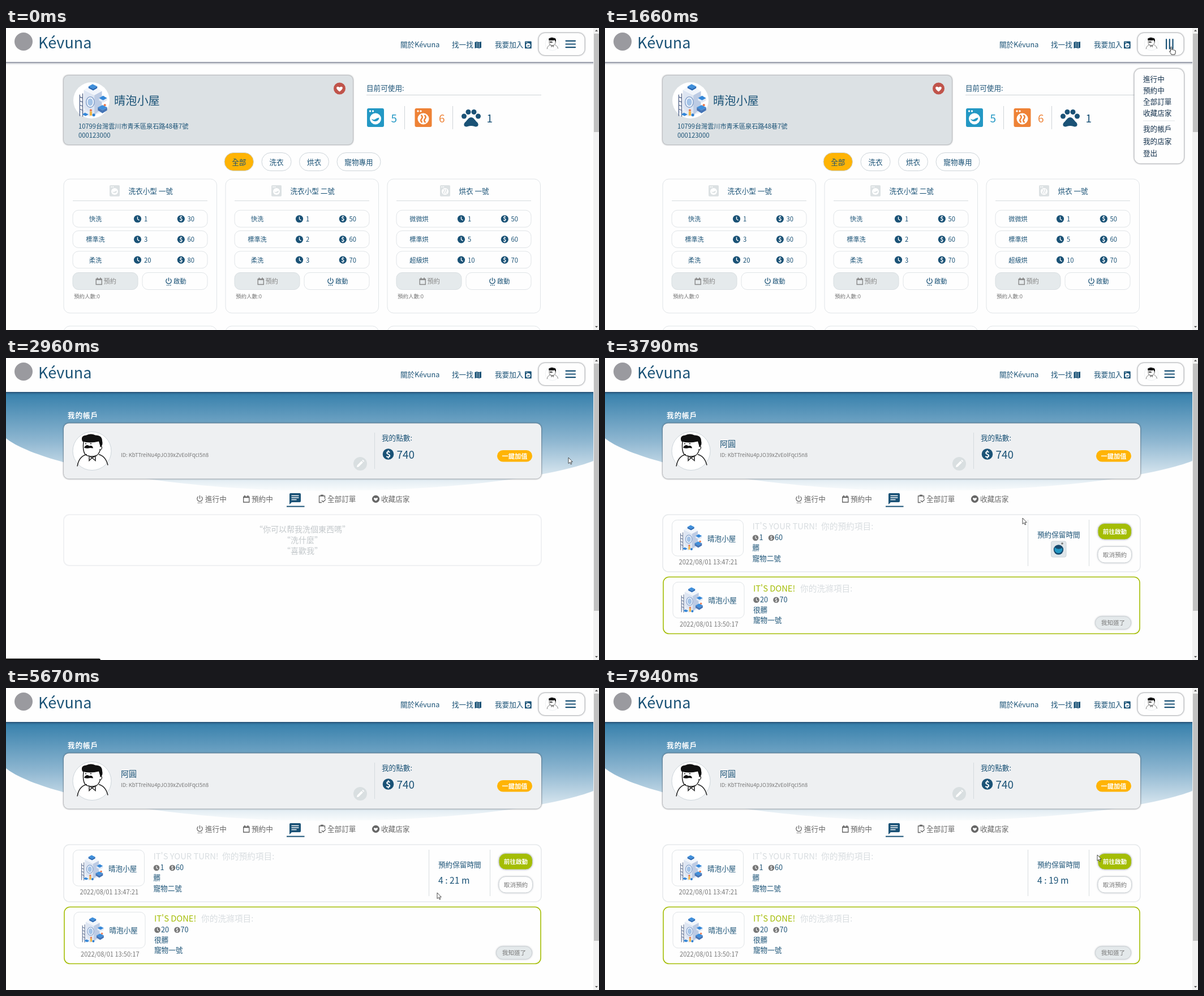
Write an HTML page that moves like this. It is 1048 px wide and 534 px high and loops after 8000 ms.

```html
<!DOCTYPE html>
<html lang="zh-Hant">
<head>
<meta charset="utf-8">
<title>Laundry booking</title>
<style>
html, body { margin: 0; width: 100%; height: 100%; overflow: hidden; background: #fefefe; }
svg { display: block; width: 100vw; height: 100vh; }
text { font-family: "Noto Sans CJK TC", "Noto Sans CJK", "Noto Sans", sans-serif; white-space: pre; }
.soft { filter: drop-shadow(0 0 1.6px rgba(45, 50, 60, .85)); }
.faint { filter: drop-shadow(0 0 1.5px rgba(60, 70, 85, .35)); }
</style>
</head>
<body>
<svg id="stage" viewBox="0 0 1048 534"></svg>
<script>
const LOOP = 8000;
const NAVY = '#1a5276', LINE = '#e0e4e7', GRAY = '#777', PALE = '#dce1e3', AMBER = '#ffb404', LIME = '#a4bd04';
const BRAND = 'Kévuna', SHOP = '晴泡小屋';

// Drawing helpers; text is placed by its vertical centre.
const text = (x, cy, s, size = 12.6, fill = NAVY, more = '') =>
  `<text x="${x}" y="${cy + size * .37}" font-size="${size}" fill="${fill}" ${more}>${s}</text>`;
const mid = (x, cy, s, size, fill, more = '') => text(x, cy, s, size, fill, 'text-anchor="middle" ' + more);
const box = (x, y, w, h, r, fill = '#fefefe', stroke = 'none', more = '') =>
  `<rect x="${x}" y="${y}" width="${w}" height="${h}" rx="${r}" fill="${fill}" stroke="${stroke}" ${more}/>`;
const dot = (x, y, r, fill, more = '') => `<circle cx="${x}" cy="${y}" r="${r}" fill="${fill}" ${more}/>`;
const path = (d, fill = 'none', stroke = 'none', width = 1, more = '') =>
  `<path d="${d}" fill="${fill}" stroke="${stroke}" stroke-width="${width}" ${more}/>`;
const at = (x, y, scale, body) => `<g transform="translate(${x} ${y}) scale(${scale})">${body}</g>`;
const layer = (id, body) => `<g id="${id}">${body}</g>`;
const BOLD = 'font-weight="700"', MEDIUM = 'font-weight="500"';

// Icons
const washer = (x, y, scale, color, dry) => at(x, y, scale,
  box(0, 0, 30, 33, 3, color) + dot(5.5, 5, 1.7, '#fff') + dot(10.5, 5, 1.7, '#fff') + dot(15, 18.5, 10, '#fff') +
  (dry
    ? path('M11 12q4 3 1 6.500t1 6.500M17 12q4 3 1 6.500t1 6.500', 'none', color, 2.6)
    : path('M8 18.500q4 3 7 .5t6.500-2.500a7 7 0 0 1-13.500 2z', color)));
const clock = (x, y, r, color) => at(x, y, r / 6.5,
  dot(0, 0, 6.5, color) + path('M0-4V.5L3 2.500', 'none', '#fff', 1.3));
const coin = (x, y, r, color) => dot(x, y, r, color) +
  mid(x, y, '$', r * 1.6, '#fff', BOLD);
const heart = (x, y, scale, fill) => at(x, y, scale,
  path('M0 5C-9-1-5-6 0-2.500C5-6 9-1 0 5z', fill));
const calendar = (x, y, color) => at(x, y, 1,
  path('M.7 2.500H10.800V12H.7z', 'none', color, 1.4) + path('M.7 3.200H10.800M3 0V3M8.500 0V3', 'none', color, 2));
const power = (x, y, color) => at(x, y, 1,
  path('M-2.700-4A4.700 4.700 0 1 0 2.700-4M0-6V0', 'none', color, 1.3) +
  path('M-3.500 7.200H4', 'none', color, 1.5, 'stroke-dasharray="1.5 1.5"'));
const paw = at(822, 159, 1,
  path('M0-1C5-1 7 5 11 8C15 13 11 17 6 15Q0 13-6 15C-11 17-15 13-11 8C-7 5-5-1 0-1z', NAVY) +
  [[-12.500, -3], [-5, -10.500], [5, -10.500], [12.500, -3]].map(([x, y]) => dot(x, y, 4.500, NAVY)).join(''));

const laundry = (x, y, scale) => at(x, y, scale,
  path('M-24 20L-4 28L24 18L6 8z', '#e8edf6') +
  path('M-14-18L4-9V25L-14 14z', '#dde5f2') + path('M4-9L17-16V14L4 25z', '#bccbe4') +
  path('M-14-18L0-26L17-16L4-9z', '#f1f5fb') +
  path('M-6-24L1-28L9-24L2-20z', '#3f8fdb') + path('M-6-24V-21L2-17L9-21V-24L2-20z', '#2767b3') +
  path('M-21-10V27M-16-12V28M-21-6l5 2m-5 5l5 2m-5 5l5 2m-5 5l5 2', 'none', '#4a5d84', 1.2) +
  '<ellipse cx="-3" cy="3" rx="7" ry="9" fill="#f7faff" stroke="#86a2cb" stroke-width="1.5"/>' +
  '<ellipse cx="-3" cy="3" rx="4.5" ry="6.5" fill="#a3c2e6"/>' +
  path('M12-4l7-4 7 4-7 4z', '#3487d8') + path('M12-4v4l7 4 7-4v-4l-7 4z', '#e3eaf5') +
  path('M10 12l8-4 8 4-8 5z', '#3f8fdb') + path('M10 12v5l8 5 8-5v-5l-8 5z', '#4574b5') +
  dot(22, 8, 2, '#e9774d') + dot(-2, 17, 2, '#e9774d') + path('M-4 19h4v7h-4z', '#f0b648') +
  dot(3, 25, 2.500, '#2d7fd0') + path('M-17 24l6 3 5-3-6-3z', '#3487d8'));

const avatar = (x, y, scale) => at(x, y, scale,
  dot(0, 0, 34, '#fff', 'stroke="#cdd5da" stroke-width="1"') +
  path('M-15-17Q-17 0-12 6Q-4 12 8 8Q14 4 16-8M-26 27Q-23 9-9 6M12 6Q24 9 28 25M-6 8L0 12L8 8M0 12l-5 5v-7m5 2l6 5v-7', 'none', '#222', 1.5) +
  path('M-17-17Q-21-27-10-28Q-2-32 6-28Q18-28 18-18Q20-10 15-7L12-17Q-4-13-17-17z', '#111') +
  path('M-14-6Q-10-13-5-9Q1-11 2-5Q-4-6-6-5Q-10-4-14-6z', '#111') +
  dot(-11, -13, 1.100, '#111') + dot(-2, -13, 1.100, '#111') +
  path('M14-8q5-1 3 4q-2 3-4 1', '#fff', '#222', 1.300));

function header() {
  return box(-8, -10, 1054, 70, 0, '#fefefe', 'none', 'style="filter:drop-shadow(0 1px 2px rgba(25,35,65,.85))"') +
    dot(31, 24, 16, '#9a9a9f') + text(57, 26, BRAND, 27) +
    text(697, 29.5, '關於' + BRAND) + text(788, 29.5, '找一找') + text(864, 29.5, '我要加入') +
    path('M828.500 25l3.500-1 4 1 4-1v11l-4 1-4-1-3.500 1z', NAVY) + path('M832.300 25v9m3.800-8v9', 'none', '#fff', .8) +
    washer(917, 23.5, .39, NAVY) +
    box(941.5, 9, 81, 39, 11, '#fefefe', 'none', 'class="soft"') + avatar(965.5, 27.5, .36) +
    layer('burger', path('M989.500 22.800H1006M989.500 28.500H1006M989.500 34.200H1006', 'none', NAVY, 2.200, 'stroke-linecap="round"'));
}

function machineCard(x, title, iconX, titleX, rows, dry) {
  const row = ([name, minutes, price], i) => {
    const cy = 337.5 + i * 36.3;
    return box(x + 16, cy - 15.3, 238, 30, 10, '#fefefe', LINE) + mid(x + 56, cy + .5, name, 11.2, NAVY) +
      clock(x + 130.5, cy, 6.6, NAVY) + text(x + 142, cy + .5, minutes, 11.2) +
      coin(x + 207.3, cy, 6.6, NAVY) + text(x + 218.5, cy + .5, price, 11.2);
  };
  return box(x, 267, 270.5, 237, 11, '#fefefe', LINE) + washer(x + iconX, 278, .6, PALE, dry) +
    text(x + titleX, 288, title) + path(`M${x + 16} 305.500h238`, 'none', '#d6dbde') + rows.map(row).join('') +
    box(x + 16, 432.5, 115, 30, 10, '#e5eaec', '#d8dee1') + calendar(x + 56.5, 441.5, '#888') +
    text(x + 70.5, 448.3, '預約', 11.2, '#888') +
    box(x + 139, 432.5, 115, 30, 10, '#fefefe', LINE) + power(x + 185.5, 447.5, NAVY) +
    text(x + 194, 448.3, '啟動', 11.2, NAVY, MEDIUM) + text(x + 18, 474.5, '預約人數:0', 9.5, GRAY) +
    box(x, 527, 270.5, 30, 11, '#fefefe', LINE);
}

function shopPage() {
  const filter = (x, w, label, fill = '#fefefe') =>
    box(x, 220.5, w, 32, 16, fill, '#cdd4d9') + mid(x + w / 2, 237, label, 12.6, NAVY);
  return box(102, 84, 511, 122, 8, '#dce1e4', 'none', 'class="soft"') +
    dot(151, 128, 32, '#fff') + laundry(152, 128, 1.03) +
    text(191, 129, SHOP, 20.2) +
    text(128, 174, '10799台灣雲川市青禾區泉石路48巷7號', 11.15, NAVY, MEDIUM) + text(128, 190, '000123000', 11.3, NAVY, MEDIUM) +
    dot(589.5, 107, 10.5, '#c0544b') + heart(589.5, 107.5, 1, '#fff') +
    text(637, 106, '目前可使用:') + path('M637 118.500H946M704.500 138V179M789.500 138V179', 'none', '#cfd4d8') +
    washer(638, 142, 1, '#2398c4') + text(680.5, 160, '5', 19, '#2398c4') +
    washer(722.5, 142, 1, '#ee8236', true) + text(765, 160, '6', 19, '#ee8236') +
    paw + text(849.5, 160, '1', 19) +
    filter(386, 51.5, '全部', AMBER) + filter(452, 52, '洗衣') + filter(518.5, 52, '烘衣') + filter(585, 77, '寵物專用') +
    machineCard(102, '洗衣小型 一號', 81, 114.5, [['快洗', 1, 30], ['標準洗', 3, 60], ['柔洗', 20, 80]]) +
    machineCard(388, '洗衣小型 二號', 81, 114.5, [['快洗', 1, 50], ['標準洗', 2, 60], ['柔洗', 3, 70]]) +
    machineCard(674, '烘衣 一號', 93, 126.5, [['微微烘', 1, 50], ['標準烘', 5, 60], ['超級烘', 10, 70]], true);
}

function menu() {
  const items = [['進行中', 90.5], ['預約中', 110.5], ['全部訂單', 130.5], ['收藏店家', 150], ['我的帳戶', 178.5], ['我的店家', 200], ['登出', 221.5]];
  return box(935.5, 72, 87.5, 167.5, 11, '#fefefe', 'none', 'class="soft"') +
    items.map(([s, y], i) => text(951, y, s, 12.6, '#14314c', i === 4 ? 'id="accountLink"' : '')).join('') +
    path('M951 164H1007', 'none', LINE);
}

function order(dx, dy, o) {
  const headline = o.done ? "IT'S DONE!" : "IT'S YOUR TURN!";
  return at(dx, dy, 1,
    box(118.5, 286.5, 126, 63.5, 9, '#fefefe', LINE) + `<g class="picture">${laundry(150.5, 318, .8)}</g>` +
    text(181, 319, SHOP) + mid(182.3, 361, o.date, 11.1, GRAY) +
    text(260.5, 297.5, headline, 14.7, o.done ? LIME : '#d8dde0', MEDIUM) +
    text(o.done ? 343.5 : 382, 297.5, `你的${o.kind}項目:`, 14.7, '#d8dde0', MEDIUM) +
    clock(266, 318, 5.3, GRAY) + text(272.5, 317.5, o.minutes) +
    coin(o.coinX, 318, 5.3, GRAY) + text(o.coinX + 6, 317.5, o.price) +
    text(260.5, 335.7, o.mode) + text(260.5, 354, o.machine));
}

function accountPage() {
  const tab = (x, s) => text(x, 249.5, s, 12.6, '#666');
  const button = (y, fill, s, color, more) =>
    box(871, y, 59.5, 28.5, 12, fill, '#cdd3d6', 'class="faint"') + mid(901, y + 14.5, s, 10.6, color, more);
  const quotes = ['“你可以帮我洗個東西嗎”', '“洗什麼”', '“喜歡我”'];
  return path('M0 60H1038V182C960 212 780 235 560 235C300 235 60 190 0 142z', 'url(#sky)') +
    text(109, 101.5, '我的帳戶', 12.6, '#fff', BOLD + ' letter-spacing=".9"') +
    box(102, 115.5, 844, 98, 9, '#eef0f2', 'none', 'class="soft"') + avatar(152, 164.5, 1) +
    layer('userName', text(203, 152, '阿圓', 14)) + text(203, 171.3, 'ID: KbTTreiNu4pJO39xZvEolFqcI5n8', 9.3, GRAY) +
    dot(626, 187, 12, '#d9dfe1') + path('M620 193l.6-3.200 7.700-7.700 2.600 2.600-7.700 7.700zM629.300 181.100l1.300-1.300 2.600 2.600-1.300 1.300z', '#fff') +
    path('M651.500 132V196', 'none', '#d5dade') + text(664, 141, '我的點數:') +
    coin(675.5, 170, 9.8, NAVY) + text(690.5, 171, '740', 19) +
    box(868, 163, 62, 20.5, 10.2, AMBER) + mid(899, 173.5, '一鍵加值', 11.2, '#fff', BOLD) +
    power(342.5, 249, '#666') + tab(352, '進行中') + calendar(419, 243, '#666') + tab(434, '預約中') +
    path('M503 239h16q2 0 2 2v12q0 2-2 2h-14l-4 4v-18q0-2 2-2z', NAVY) +
    path('M504.500 243.500h13m-13 3.500h13m-13 3.500h9', 'none', '#fff', 1.600) + path('M496 262.500H527.500', 'none', NAVY, 2) +
    path('M558 255.500h-4.500v-11.500h10v5M556.500 244v-1.500h4v1.500M558 252l2.500 2.500 4.500-4.500', 'none', '#666', 1.300) + tab(568, '全部訂單') +
    dot(653.5, 249.3, 6.6, '#666') + heart(653.5, 249.6, .65, '#fff') + tab(663, '收藏店家') +
    layer('empty', box(102, 277, 844, 90, 10, '#fefefe', '#f0f1f3', 'stroke-width="2"') +
      quotes.map((s, i) => mid(524, 303 + i * 19, s, 14, '#c3c8cb', MEDIUM)).join('')) +
    layer('orders',
      box(102, 277, 844, 101, 10, '#fefefe', '#e6e9eb', 'stroke-width="1.5"') +
      order(0, 0, { date: '2022/08/01 13:47:21', kind: '預約', minutes: 1, coinX: 294, price: 60, mode: '髒', machine: '寵物二號' }) +
      path('M747.500 286V368M855.500 286V368', 'none', '#d8dde0') + text(764, 312, '預約保留時間') +
      layer('spinner', box(788.5, 324, 26.5, 28, 3, '#dfe6ea', '#cbd4d9') + dot(808, 328, 1.8, GRAY) +
        dot(801.5, 339, 8.7, '#164a6e') +
        layer('drum', path('M795 335Q800 340 808 336A7 7 0 1 1 795 335z', '#2398c4'))) +
      text(764, 340, '', 15.7, NAVY, 'id="countdown"') +
      button(292.5, LIME, '前往啟動', '#fff', BOLD) + button(333.5, '#fefefe', '取消預約', GRAY) +
      box(103, 387.3, 842, 100.2, 10, '#fefefe', LIME, 'stroke-width="1.6"') +
      order(1.5, 109.8, { done: true, date: '2022/08/01 13:50:17', kind: '洗滌', minutes: 20, coinX: 301, price: 70, mode: '很髒', machine: '寵物一號' }) +
      box(866.5, 457, 63, 22.5, 11.2, '#e4e9eb', '#cbd1d5', 'class="faint"') + mid(898, 468.3, '我知道了', 10.6, GRAY));
}

const chrome = box(1038, 0, 10, 534, 0, '#f1f1f1') +
  '<rect id="thumb" x="1039" y="10" width="9" height="174" fill="#c1c1c1"/>' +
  path('M1041 6l2.500-3 2.500 3zM1041 527l2.500 3 2.500-3z', '#555') +
  layer('status', path('M0 531.500H165Q167 531.500 167 534H0z', '#111'));

const pointer = layer('cursor',
  layer('click', dot(1, 2, 9, '#fbe62a', 'opacity=".8"')) +
  layer('arrow', path('M0 0V10.500L2.500 8.300L4.200 12L5.800 11.300L4.200 7.700H7.300z', '#fff', '#222', .8)) +
  layer('hand', path('M-1 1Q0-1 1.200 1V5.500Q3 4 4 6Q5.500 5 6.200 6.700Q7.800 6.200 7.800 8Q8 11 6.500 14H.5Q-1 11-3 8.500Q-3 6.500-1 8.500z', '#fff', '#222', .9)));

stage.innerHTML =
  `<defs><linearGradient id="sky" gradientUnits="userSpaceOnUse" x1="0" y1="60" x2="0" y2="235">
    <stop offset="0" stop-color="#357fab"/><stop offset=".5" stop-color="#8fb7d1"/><stop offset="1" stop-color="#fafcfd"/>
  </linearGradient></defs>` + box(0, 0, 1048, 534, 0) +
  layer('shop', shopPage()) + layer('account', accountPage()) + header() + layer('menu', menu()) + chrome + pointer;

const $ = id => document.getElementById(id);
const show = (id, on) => $(id).setAttribute('display', on ? 'inline' : 'none');
const within = (t, a, b) => t >= a && t < b;
const ramp = (t, a, b) => { const p = Math.min(1, Math.max(0, (t - a) / (b - a))); return p * p * (3 - 2 * p); };

// Pointer stops: time, x, y
const TRACK = [
  [130, 1044, 512], [900, 1003, 38], [970, 1003, 37], [1110, 1000.5, 33], [1660, 1000.5, 33], [2070, 1027, 112],
  [2350, 1041, 150], [2680, 994, 176], [2960, 994, 176], [3650, 746, 228], [3790, 738, 283], [4140, 800, 287],
  [4470, 800, 287], [4750, 847, 312], [5000, 828, 366], [5240, 778, 362], [5670, 762, 362], [6090, 374, 292],
  [6160, 368, 298], [6380, 354, 312], [6790, 477, 333], [7250, 477, 333], [7940, 870, 295]];

function pointerAt(t) {
  const next = TRACK.findIndex(stop => stop[0] > t);
  if (next < 1) return (next ? TRACK[TRACK.length - 1] : TRACK[0]).slice(1);
  const [a, b] = [TRACK[next - 1], TRACK[next]];
  const p = ramp(t, a[0], b[0]);
  return [a[1] + (b[1] - a[1]) * p, a[2] + (b[2] - a[2]) * p];
}

function render(t) {
  const onAccount = t >= 2960, loaded = t >= 3160, counting = t >= 4140;
  show('shop', !onAccount);
  show('account', onAccount);
  show('userName', loaded);
  show('empty', !loaded);
  show('orders', loaded);
  document.querySelectorAll('.picture').forEach(p => p.setAttribute('opacity', t >= 3720 ? 1 : 0));

  show('menu', within(t, 1250, 2960));
  $('menu').setAttribute('opacity', ramp(t, 1250, 1500));
  $('burger').setAttribute('transform', `rotate(${onAccount ? 0 : 90 * ramp(t, 1250, 1550)} 997.8 28.5)`);
  const hover = within(t, 2600, 2960);
  $('accountLink').setAttribute('fill', hover ? '#f5a01d' : '#14314c');
  $('accountLink').setAttribute('font-weight', hover ? 500 : 400);

  show('spinner', !counting);
  $('drum').setAttribute('transform', `rotate(${(t - 3790) * .36} 801.5 339)`);
  const seconds = 22 - [5160, 6170, 7250].filter(tick => t >= tick).length;
  $('countdown').textContent = counting ? `4 : ${seconds} m` : '';

  const [x, y] = pointerAt(t);
  const hand = within(t, 970, 1780) || hover;
  show('cursor', t >= 130);
  $('cursor').setAttribute('transform', `translate(${x} ${y})`);
  show('hand', hand);
  show('arrow', !hand);
  show('click', within(t, 1250, 1390) || within(t, 2820, 2960));
  show('status', within(t, 2600, 3300));
  $('thumb').setAttribute('height', onAccount ? 437 : 174);
  $('thumb').setAttribute('fill', x > 1038 && y < 184 ? '#a8a8a8' : '#c1c1c1');
}

const start = performance.now();
function frame() {
  render((performance.now() - start) % LOOP);
  requestAnimationFrame(frame);
}
frame();
</script>
</body>
</html>
```
